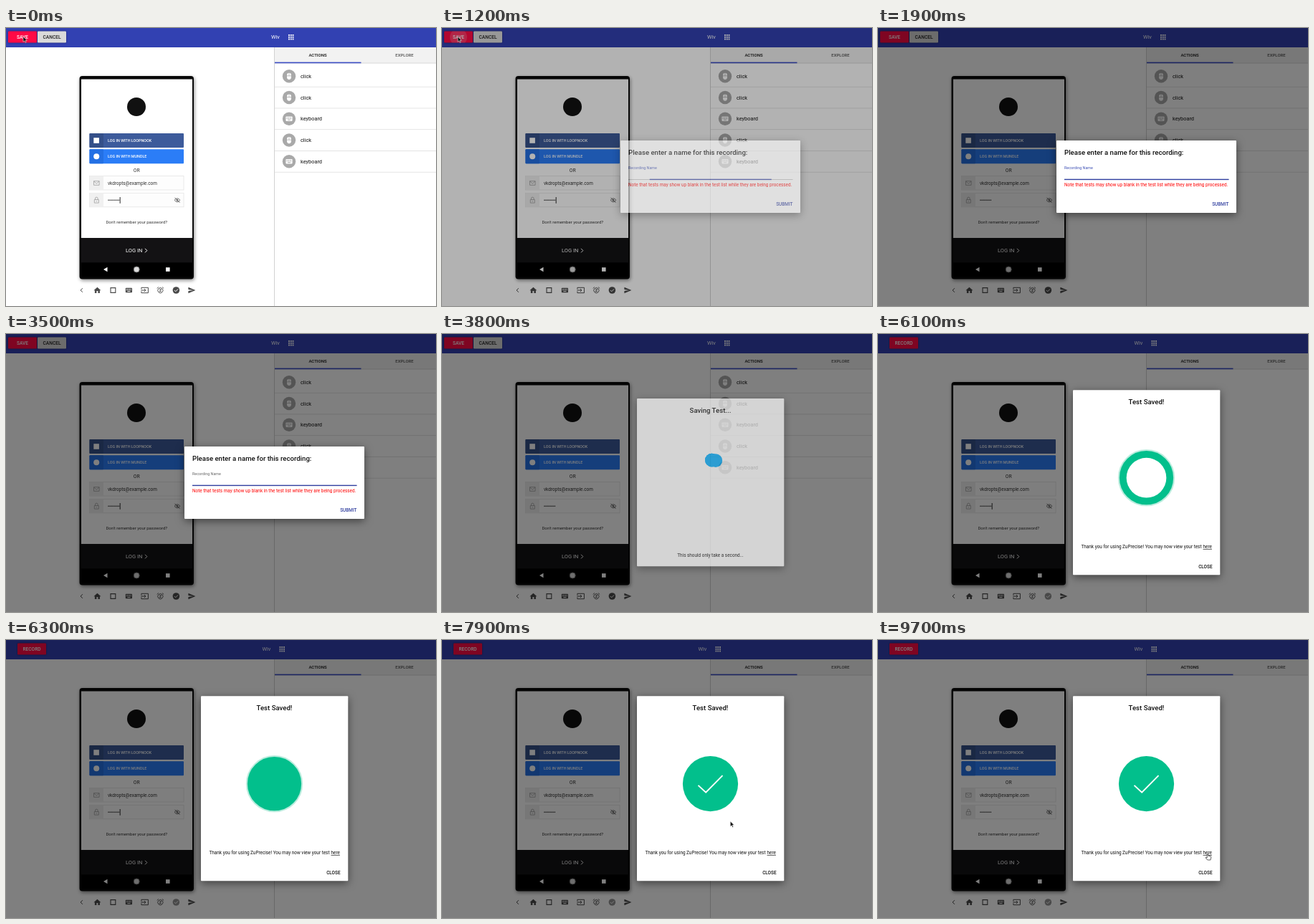
Recreate the animation shown at these times as an HTML page. Size 600 by 388 pixels, loop 9.9 s.

```html
<!DOCTYPE html>
<html lang="en">
<head>
<meta charset="utf-8">
<title>Saving a recorded test</title>
<style>
html, body { margin: 0; width: 100%; height: 100%; overflow: hidden; background: #fff; }
svg { display: block; width: 100vw; height: 100vh; font-family: Roboto, Arial, sans-serif; }
.raised { filter: drop-shadow(0 .8px .8px rgba(0,0,0,.4)); }
.device { filter: drop-shadow(1px 2px 2.5px rgba(0,0,0,.45)); }
.dialog { filter: drop-shadow(0 3px 6px rgba(0,0,0,.5)); }
</style>
</head>
<body>
<svg id="stage" viewBox="0 0 600 388" xmlns="http://www.w3.org/2000/svg"></svg>
<script>
const LOOP = 9900, STEP = 100;
const stage = document.getElementById('stage');

const rect = (x, y, w, h, fill, extra = '') =>
  `<rect x="${x}" y="${y}" width="${w}" height="${h}" fill="${fill}" ${extra}/>`;
const disc = (x, y, r, fill, extra = '') =>
  `<circle cx="${x}" cy="${y}" r="${r}" fill="${fill}" ${extra}/>`;
const path = (d, fill, extra = '') => `<path d="${d}" fill="${fill}" ${extra}/>`;
const line = (d, color, width = 1, extra = '') =>
  path(d, 'none', `stroke="${color}" stroke-width="${width}" ${extra}`);
const group = (id, body, extra = '') => `<g id="${id}" ${extra}>${body}</g>`;
const at = (x, y, body) => `<g transform="translate(${x} ${y})">${body}</g>`;

// Text placed by the middle of its capitals.
const text = (x, y, size, str, fill, weight = 400, anchor = 'start', extra = '') =>
  `<text x="${x}" y="${y + size * .36}" font-size="${size}" font-weight="${weight}" fill="${fill}" text-anchor="${anchor}" ${extra}>${str}</text>`;

const button = (x, label, fill, color) =>
  rect(x, 4.5, 40, 16, fill, 'rx="1.3" class="raised"') +
  text(x + 20, 12.6, 6.6, label, color, 500, 'middle');

function keyboard(color, hole) {
  let keys = rect(-4.6, -3.2, 9.2, 6.4, color, 'rx=".8"');
  for (let row = 0; row < 2; row++)
    for (let i = 0; i < 5; i++)
      keys += rect(-3.6 + i * 1.5, -2.1 + row * 1.5, .9, .9, hole);
  return keys + rect(-2, 1.1, 4, .9, hole);
}

const mouse =
  path('M-3 -.6V-1.5A2.8 3 0 0 1 -.3 -4.5V-.6ZM.3 -.6V-4.5A2.8 3 0 0 1 3 -1.5V-.6ZM-3 .1H3V1.6A3 3.1 0 0 1 -3 1.6Z', '#fff');

function appBar() {
  let grid = '';
  for (let i = 0; i < 9; i++)
    grid += rect(394 + (i % 3) * 2.8, 9 + Math.floor(i / 3) * 2.8, 1.9, 1.9, '#fff');
  return rect(0, 0, 600, 27, '#3241b2') +
    group('brand', text(370, 12.6, 7.4, 'Wiv', '#fff') + grid) +
    group('editing',
      button(3, 'SAVE', '#ff0a45', '#fff') +
      '<clipPath id="saveClip"><rect x="3" y="4.5" width="40" height="16" rx="1.3"/></clipPath>' +
      disc(23, 13, 1, '#fff', 'id="ripple" clip-path="url(#saveClip)"') +
      button(44, 'CANCEL', '#dadada', '#222')) +
    group('idle', button(16, 'RECORD', '#ff0a45', '#fff'));
}

function sidePanel() {
  const rows = ['click', 'click', 'keyboard', 'click', 'keyboard'].map((name, i) => {
    const y = 67.2 + i * 29.75;
    return disc(395, y, 9.2, '#a9a9a9') +
      at(395, y, name === 'click' ? mouse : keyboard('#fff', '#a9a9a9')) +
      text(411, y, 7.4, name, '#111') +
      rect(375, y + 14.6, 225, .8, '#dedede');
  }).join('');
  return rect(374, 27, 1, 361, '#d2d2d2') +
    rect(375, 27, 225, 22, '#f2f2f2') +
    rect(375, 48.6, 225, .8, '#cfcfcf') +
    rect(375, 47.6, 120.5, 1.6, '#3a4cc4') +
    text(435, 38.2, 6, 'ACTIONS', '#111', 500, 'middle') +
    text(556, 38.2, 6, 'EXPLORE', '#555', 500, 'middle') +
    group('rows', rows);
}

const social = (y, fill, side, mark, label) =>
  rect(116.5, y, 131.5, 20, fill, 'rx="1"') +
  rect(116.5, y, 19.5, 20, side, 'rx="1"') + mark +
  text(142, y + 10, 5.4, 'LOG IN WITH ' + label, '#fff', 500);

const field = (y, icon) =>
  rect(116.5, y, 131.5, 19.5, '#fdfdfd', 'stroke="#e4e4e4" stroke-width=".8"') +
  rect(116.5, y, 19.5, 19.5, '#f0f0f0') + at(126.3, y + 10, icon);

function phone() {
  const envelope = line('M-3.8 -2.8H3.8V2.8H-3.8ZM-3.8 -2.6L0 .6L3.8 -2.6', '#a0a0a0', .8);
  const lock = line('M-3 -.8H3V3.8H-3ZM-1.8 -.8V-2.4A1.8 1.8 0 0 1 1.8 -2.4V-.8M0 .8V2.2', '#a0a0a0', .8);
  const eye = line('M-4 0Q0 -5 4 0Q0 5 -4 0ZM-3.5 -3.5L3.5 3.5', '#666', .9) + disc(0, 0, 1.3, '#666');
  let dots = '';
  for (let i = 0; i < 8; i++) dots += disc(143 + i * 2.05, 240.2, .75, '#222');
  return rect(102.5, 67, 159.5, 283.5, '#080808', 'rx="4" class="device"') +
    rect(105, 71.5, 155, 221.5, '#fff') +
    disc(182, 110, 13, '#111') +
    social(147, '#3d5b9b', '#355089', rect(122.3, 153.2, 7.6, 7.6, '#fff'), 'LOOPNOOK') +
    social(169.2, '#2b7df7', '#2470e4', disc(126.2, 179.2, 4, '#fff'), 'MUNDLE') +
    text(182.3, 198.3, 6.8, 'OR', '#333', 400, 'middle') +
    field(206.5, envelope) + text(142, 216.7, 6.4, 'vkdropts@example.com', '#333') +
    field(230.3, lock) + dots +
    rect(158.7, 236, .9, 8.8, '#111', 'id="caret"') + at(239, 240.3, eye) +
    text(182.3, 271, 6, 'Don\'t remember your password?', '#333', 400, 'middle') +
    rect(105, 293, 155, 34.5, '#131214') + rect(105, 327.5, 155, 20, '#000') +
    text(167, 310.6, 7.5, 'LOG IN', '#fff') +
    line('M194 307.8L196.8 310.6L194 313.4', '#fff', 1) +
    path('M136 337L141.5 333.7V340.3Z', '#fff') +
    disc(182.2, 337, 4, '#ddd', 'stroke="#777" stroke-width="1"') +
    rect(223, 334.2, 5.6, 5.6, '#fff');
}

function toolbar() {
  const c = '#4a4a4a';
  const icons = [
    line('M1.5 -2.8L-1.3 0L1.5 2.8', c, 1),
    path('M0 -4.2L5 .3H3.5V4H1V1H-1V4H-3.5V.3H-5Z', c),
    line('M-3.4 -3.4H3.4V3.4H-3.4Z', c, 1.1),
    keyboard(c, '#fff'),
    line('M-4.5 -1.5V-3.7H5V3.7H-4.5V1.5M-5 0H1.5M-.5 -2L1.5 0L-.5 2', c, 1),
    line('M-2.5 2.8A3.6 3.6 0 1 1 2.5 2.8A3.6 3.6 0 0 1 -2.5 2.8M-4.7 -2.6L-2.5 -4.5M4.7 -2.6L2.5 -4.5M-1.4 -1.2H1.4L-1.4 1.7H1.4', c, .9),
    disc(0, 0, 4.8, c, 'id="done"') + line('M-2.5 0L-.7 1.8L2.6 -1.6', '#fff', 1),
    path('M-5 -4.2L5 0L-5 4.2V1L2 0L-5 -1Z', c)
  ];
  return icons.map((icon, i) => at(105.4 + i * 22, 366, icon)).join('');
}

const dialog = (id, x, y, w, h, body) =>
  group(id, rect(x, y, w, h, '#fff', 'rx="1" class="dialog"') + body);

function dialogs() {
  const nameBox = dialog('nameBox', 249, 157, 251, 101,
    text(260, 173.4, 9.6, 'Please enter a name for this recording:', '#111', 500) +
    text(260, 195, 5.4, 'Recording Name', '#3f51b5', 400, 'start', 'id="label"') +
    rect(260, 211, 229.5, .7, '#aaa') +
    rect(260, 210.7, 229.5, 1.4, '#303f9f', 'id="underline"') +
    text(260, 218.8, 6.39, 'Note that tests may show up blank in the test list while they are being processed.', '#f00') +
    text(489.5, 246, 6.4, 'SUBMIT', '#303f9f', 500, 'end'));

  const savingBox = dialog('savingBox', 272, 90, 205.3, 234.3,
    text(374.5, 106.3, 9.6, 'Saving Test...', '#111', 500, 'middle') +
    disc(0, 0, 9.3, '#03adfc', 'class="dot"').repeat(5) +
    text(374.5, 309, 6.4, 'This should only take a second...', '#111', 400, 'middle'));

  const savedBox = dialog('savedBox', 272, 78.3, 205.3, 258,
    text(374.5, 94.5, 9.6, 'Test Saved!', '#111', 500, 'middle') +
    group('badge',
      disc(0, 0, 38.6, '#02bf8c') +
      disc(0, 0, 38.6, 'none', 'id="halo" stroke="#b9ecdd" stroke-width="2"') +
      disc(0, 0, 0, '#fff', 'id="hole"') +
      line('M-17 2.2L-6.3 12L17 -11.6', '#fff', 1.9, 'id="tick" pathLength="1" stroke-dasharray="1 2"')) +
    text(283.5, 297, 6.4, 'Thank you for using ZuPrecise! You may now view your test', '#111') +
    text(453.5, 297, 6.4, 'here', '#111', 400, 'start', 'text-decoration="underline"') +
    text(466.5, 324.5, 6.4, 'CLOSE', '#111', 500, 'end'));
  return nameBox + savingBox + savedBox;
}

const pointers =
  group('arrow', path('M0 0V7.4L1.8 5.8L3 8.5L4.2 8L3 5.3H5.3Z', '#111', 'stroke="#fff" stroke-width=".5"')) +
  group('hand', path('M-.8 5V.8A.8 .8 0 0 1 .8 .8V3.2L4.2 3.9Q5 4.2 4.8 5.2L4 9H-.2L-3 5.8Q-2.6 4.6 -.8 6Z',
    '#fff', 'stroke="#222" stroke-width=".7" stroke-linejoin="round"'));

stage.innerHTML = rect(0, 0, 600, 388, '#fff') + sidePanel() + appBar() + phone() + toolbar() +
  rect(0, 0, 600, 388, '#000', 'id="shade"') + dialogs() + pointers;

const el = {};
stage.querySelectorAll('[id]').forEach(node => el[node.id] = node);
const spinner = [...stage.querySelectorAll('.dot')];

const ramp = (t, from, to) => Math.min(1, Math.max(0, (t - from) / (to - from)));
const ease = u => u * u * (3 - 2 * u);
const mix = (a, b, u) => a + (b - a) * u;
const show = (node, on) => node.setAttribute('visibility', on ? 'visible' : 'hidden');
const fade = (node, v) => { node.setAttribute('opacity', v); show(node, v > 0); };
const move = (node, x, y, s = 1) => node.setAttribute('transform', `translate(${x} ${y}) scale(${s})`);

function drawSpinner(t) {
  const phase = (((t - 5300) / 1600) % 1 + 1) % 1;
  spinner.forEach((dot, i) => {
    const turn = 2 * Math.PI * ease(ramp(phase, i * .08, i * .08 + .68)) + .04;
    move(dot, 375 + 36.5 * Math.sin(turn), 212.5 - 36.5 * Math.cos(turn));
  });
}

function drawBadge(t) {
  const pulse = 1 + .1 * Math.sin(Math.PI * ramp(t, 6400, 6700));
  move(el.badge, 374.5, 200.7, pulse);
  show(el.halo, t >= 6100 && t < 6600);
  el.hole.setAttribute('r', 37.6 * (1 - ease(ramp(t, 6000, 6300))));
  const drawn = ease(ramp(t, 6300, 6700));
  el.tick.setAttribute('stroke-dashoffset', 1 - drawn);
  show(el.tick, t >= 6100 && drawn > 0);
}

function drawPointer(t) {
  const start = t < 1500;
  const go = ease(ramp(t, 7900, 8700));
  const onLink = t >= 8600;
  if (start) move(el.arrow, mix(24, 22, ease(ramp(t, 300, 900))), 12);
  else move(el.arrow, mix(402.3, 460, go), mix(253, 298, go));
  move(el.hand, 460, 298);
  show(el.arrow, start || (t >= 7400 && !onLink));
  show(el.hand, onLink);
}

function draw(t) {
  const saved = t >= 6100;
  show(el.editing, !saved);
  show(el.idle, saved);
  show(el.rows, !saved);
  move(el.brand, saved ? -12.5 : 0, 0);
  el.done.setAttribute('fill', saved ? '#949494' : '#4a4a4a');
  show(el.caret, t % 1000 < 550);

  const ripple = ramp(t, 900, 1500);
  el.ripple.setAttribute('r', 24 * ripple);
  fade(el.ripple, ripple > 0 ? .35 * (1 - ripple) : 0);

  const open = ramp(t, 1050, 1300);
  fade(el.shade, .5 * open);
  fade(el.nameBox, open * (1 - ramp(t, 3500, 3700)));
  fade(el.savingBox, saved ? 0 : ramp(t, 3600, 3900));
  fade(el.savedBox, saved ? 1 : 0);

  const half = 114.75 * ease(ramp(t, 1000, 1300));
  el.underline.setAttribute('x', 374.75 - half);
  el.underline.setAttribute('width', 2 * half);
  el.label.setAttribute('fill', t < 3400 ? '#3f51b5' : '#666');

  const saving = t >= 3600 && !saved;
  spinner.forEach(dot => dot.setAttribute('display', saving ? 'inline' : 'none'));
  if (saving) drawSpinner(t);
  drawBadge(t);
  drawPointer(t);
}

const begin = performance.now();
function tick() {
  const t = (performance.now() - begin) % LOOP;
  draw(Math.floor(t / STEP) * STEP);
  requestAnimationFrame(tick);
}
tick();
</script>
</body>
</html>
```
